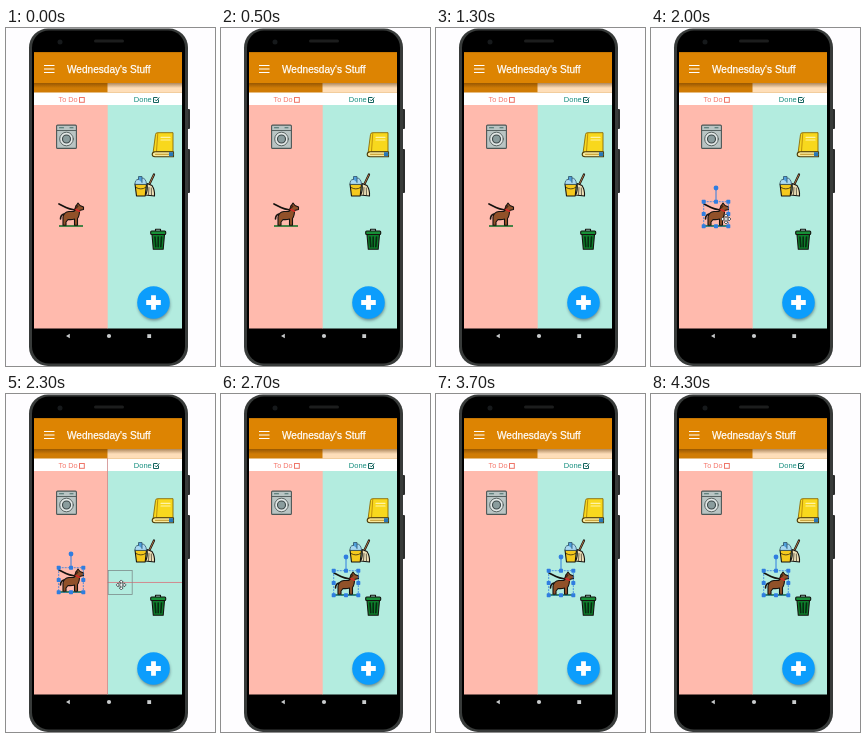
An HTML page that plays this animation: 209x338 px, repeating every 4.4 s.

```html
<!DOCTYPE html>
<html lang="en">
<head>
<meta charset="utf-8">
<title>Chore board</title>
<style>
html, body { margin: 0; width: 100%; height: 100%; overflow: hidden; background: #fefdff; }
svg { display: block; width: 209px; height: 338px; }
text { font-family: "Liberation Sans", Arial, sans-serif; }
.ink { stroke: #15120f; stroke-width: 1.1; stroke-linejoin: round; stroke-linecap: round; }
</style>
</head>
<body>
<svg viewBox="0 0 209 338">
  <defs>
    <linearGradient id="shade" x2="0" y2="1">
      <stop stop-color="#5c3000" stop-opacity=".5"/>
      <stop offset="1" stop-color="#5c3000" stop-opacity="0"/>
    </linearGradient>
    <filter id="blur" x="-50%" y="-50%" width="200%" height="200%"><feGaussianBlur stdDeviation="1.7"/></filter>
  </defs>

  <!-- phone -->
  <g fill="#2b2d2d">
    <rect x="180" y="81" width="4" height="20" rx="1"/>
    <rect x="180" y="121" width="4" height="44" rx="1"/>
  </g>
  <rect x="23" y=".5" width="159" height="337.500" rx="19" fill="#383b3a"/>
  <rect x="26" y="2.500" width="153" height="333" rx="17"/>
  <rect x="88" y="11.500" width="30" height="3" rx="1.500" fill="#1c1d1d"/>
  <circle cx="54" cy="14" r="2.500" fill="#16191b"/>

  <!-- screen -->
  <rect x="28" y="64" width="148" height="13" fill="#fff"/>
  <rect x="28" y="77" width="74" height="223.500" fill="#ffbaad"/>
  <rect x="101.700" y="77" width="74.300" height="223.500" fill="#b3ecdf"/>
  <rect x="28" y="24.300" width="148" height="40.200" fill="#d07c05"/>
  <rect x="28" y="24.300" width="148" height="31" fill="#dd8402"/>
  <rect x="101.500" y="55" width="74.500" height="9.500" fill="#fedeb9"/>
  <rect x="28" y="55" width="148" height="5" fill="url(#shade)"/>
  <path d="M38 37.500h10.500M38 41h10.500M38 44.500h10.500" stroke="#fff" stroke-width="1.100"/>
  <text x="61" y="44.500" font-size="10.100" fill="#fff" stroke="#fff" stroke-width=".25">Wednesday's Stuff</text>
  <text x="52.500" y="74" font-size="7.300" fill="#f5786c">To Do</text>
  <text x="127.800" y="74" font-size="7.500" fill="#178f80">Done</text>
  <rect x="73.500" y="69.500" width="4.800" height="4.800" fill="none" stroke="#ee7568"/>
  <path d="M152.500 71.500v3h-5v-5h4M149 71.500l1.300 1.400 3-3.500" fill="none" stroke="#14645e"/>
  <g fill="#c9cccd">
    <path d="M60 308l3.800-2.200v4.400z"/>
    <circle cx="103" cy="308" r="2.100"/>
    <rect x="141.300" y="306.200" width="3.800" height="3.800"/>
  </g>

  <!-- washing machine -->
  <g class="ink" transform="translate(50 96.500)">
    <rect x=".6" y=".6" width="19.800" height="23.300" rx="1" fill="#b9c4c3" stroke="#4c5756"/>
    <path d="M1 6h19" stroke="#4c5756" stroke-width=".9"/>
    <path d="M3.500 3.300h4" stroke="#456c68"/>
    <path d="M14 3.300h3" stroke="#456c68"/>
    <circle cx="10.500" cy="14.500" r="6.800" fill="#e3e8e7" stroke="#4c5756" stroke-width=".9"/>
    <circle cx="10.500" cy="14.500" r="4" fill="#8a9c9d" stroke="#3c4748"/>
  </g>

  <!-- book -->
  <g class="ink" transform="translate(145.500 104)">
    <path d="M1.500 21.500L4 2.500Q4.200.700 6 .700h15.500v19H5" fill="#f8d81d" stroke="#8c6b05" stroke-width=".9"/>
    <path d="M6.300 1L5 19.500" stroke="#b98a08" stroke-width=".9"/>
    <path d="M21.500 19.700H3.500q-2.800.3-2.800 2.600t2.800 2.500h18.500v-5" fill="#f8e99c" stroke="#4a3906"/>
    <path d="M4 22.300h17.500" stroke="#bb8d1b" stroke-width=".9"/>
    <path d="M17.500 20.200h4.200v4h-4.200z" fill="#2878b8" stroke="none"/>
    <path d="M9.500 5.300h9M9.500 8h9" stroke="#fff3a5" stroke-width="1.200"/>
  </g>

  <!-- bucket and broom -->
  <g class="ink" transform="translate(127.500 145.500)">
    <path d="M20.500 1L16 10.500" stroke-width="2.200"/>
    <path d="M20.300 1.300L16 10.500" stroke="#b87b48" stroke-width=".9"/>
    <path d="M13.500 10l5 2q3 4.500 2.500 10.500l-9-1q2.500-4 1.500-11.500z" fill="#ecdfb5"/>
    <path d="M15.500 14l-.5 7M17.800 14.500l.2 7" stroke-width=".6"/>
    <path d="M1.500 10.500h11.500l-1.300 12h-8.700z" fill="#f5c91d"/>
    <path d="M1.500 10.500q0-4.500 3-4.500 1-3 4-1.500 4 0 4.500 6z" fill="#a9d9f2" stroke="#31556b" stroke-width=".8"/>
    <path d="M5 6V3h3.500v6" fill="#4f9fdb" stroke="#31556b" stroke-width=".8"/>
    <path d="M2.500 14q5 3 9.500 0" fill="none" stroke-width=".7"/>
  </g>

  <!-- bin -->
  <g class="ink" stroke-width="1.300" transform="translate(144 200.500)">
    <path d="M5.500 2.500V.700h5v1.800" fill="none"/>
    <path d="M2 6h12.500l-1.300 14.800H3.300z" fill="#0d7d2b"/>
    <rect x=".7" y="2.500" width="15" height="3.500" rx="1" fill="#188f38"/>
    <path d="M5 8.500l.8 9.700M8.200 8.500v9.700M11.500 8.500l-.7 9.700" stroke="#062b10" stroke-width="1.600"/>
  </g>

  <!-- add button -->
  <circle cx="148" cy="276.500" r="16" fill="#234" opacity=".5" filter="url(#blur)"/>
  <circle cx="147.500" cy="274.500" r="16.300" fill="#0c9dfc"/>
  <path d="M147.500 267.200v14.600M140.200 274.500h14.600" stroke="#fff" stroke-width="4.800"/>

  <!-- dog, centred on its own origin -->
  <g id="dog">
    <path d="M-12 12H12" stroke="#18752e" stroke-width="1.600"/>
    <g class="ink">
      <path d="M-7 0q-3.500 1-3.500 5" fill="none" stroke-width="1.600"/>
      <path d="M-8 3Q-7-2-2-2.500H3L5-8 7-11l2 2.500 3.500 1.500v2.500l-4 1Q8.500 2 6.500 4.500v6.700H3.500V5q-3 1-6.500.5L-5 8v3.200H-8V7.500z" fill="#915129"/>
      <path d="M-12-10Q-8-8-5-6.500T4-4" fill="none" stroke-width="1.700"/>
      <path d="M4.500-4.800l4 2" stroke="#d32a26" stroke-width="1.700"/>
      <path d="M5-8.500L4-4.800 7-7.500z" fill="#5e3018" stroke-width=".6"/>
    </g>
  </g>
  <g id="picked" fill="#2f7de0">
    <path d="M0-12.500V-26" stroke="#2f7de0"/>
    <rect x="-12.300" y="-12.300" width="24.600" height="24.600" fill="none" stroke="#2f7de0" stroke-width=".8" stroke-dasharray="2 1"/>
    <circle cy="-26" r="2.400"/>
    <g id="handles"></g>
  </g>

  <!-- drag outline and guides -->
  <g id="drag" fill="none">
    <path id="rowLine" d="M101 0H176" stroke="#d9727b" stroke-width=".8"/>
    <path id="columnLine" d="M101.500 64V300" stroke="#d08a8a" stroke-width=".8"/>
    <rect id="ghost" x="-12" y="-12" width="24" height="24" stroke="#7c8d8b" stroke-width=".8"/>
  </g>
  <g id="cursor" stroke-linejoin="round">
    <path d="M0-5l2 2H.8V-.8H3V-2L5 0 3 2V.8H.8V3H2L0 5-2 3h1.200V.8H-3V2L-5 0l2-2v1.200h2.200V-3H-2z" fill="#fff" stroke="#3d4646" stroke-width=".8"/>
  </g>
</svg>
<script>
const $ = id => document.getElementById(id);
const place = (id, x, y) => $(id).setAttribute('transform', `translate(${x} ${y})`);
const show = (id, on) => $(id).setAttribute('visibility', on ? 'visible' : 'hidden');
const LOOP = 4400, PICK = 1700, GRAB = 2000, DROP = 2600;
const from = [65, 186], to = [125, 189];

for (const x of [-12.3, 0, 12.3])
  for (const y of [-12.3, 0, 12.3])
    if (x || y) $('handles').innerHTML += `<rect x="${x - 2}" y="${y - 2}" width="4" height="4" rx=".7"/>`;

function draw(t) {
  const dropped = t >= DROP, dragging = t > GRAB && !dropped;
  const p = Math.min(1, Math.max(0, (t - GRAB) / 500));
  const ease = 1 - (1 - p) ** 1.87;
  const [x, y] = from.map((a, i) => a + (to[i] - a) * ease);
  const spot = dropped ? to : from;
  place('dog', ...spot);
  place('picked', ...spot);
  place('ghost', x, y);
  place('rowLine', 0, y);
  place('cursor', dragging ? x + 1 : 75, dragging ? y + 2.5 : 191);
  show('picked', t >= PICK);
  show('drag', dragging);
  show('columnLine', dragging && Math.abs(x - 114) < 5);
  show('cursor', t >= PICK && !dropped);
}

const start = performance.now();
function tick() {
  const t = (performance.now() - start) % LOOP;
  draw(Math.floor(t / 100) * 100);
  requestAnimationFrame(tick);
}
tick();
</script>
</body>
</html>
```
